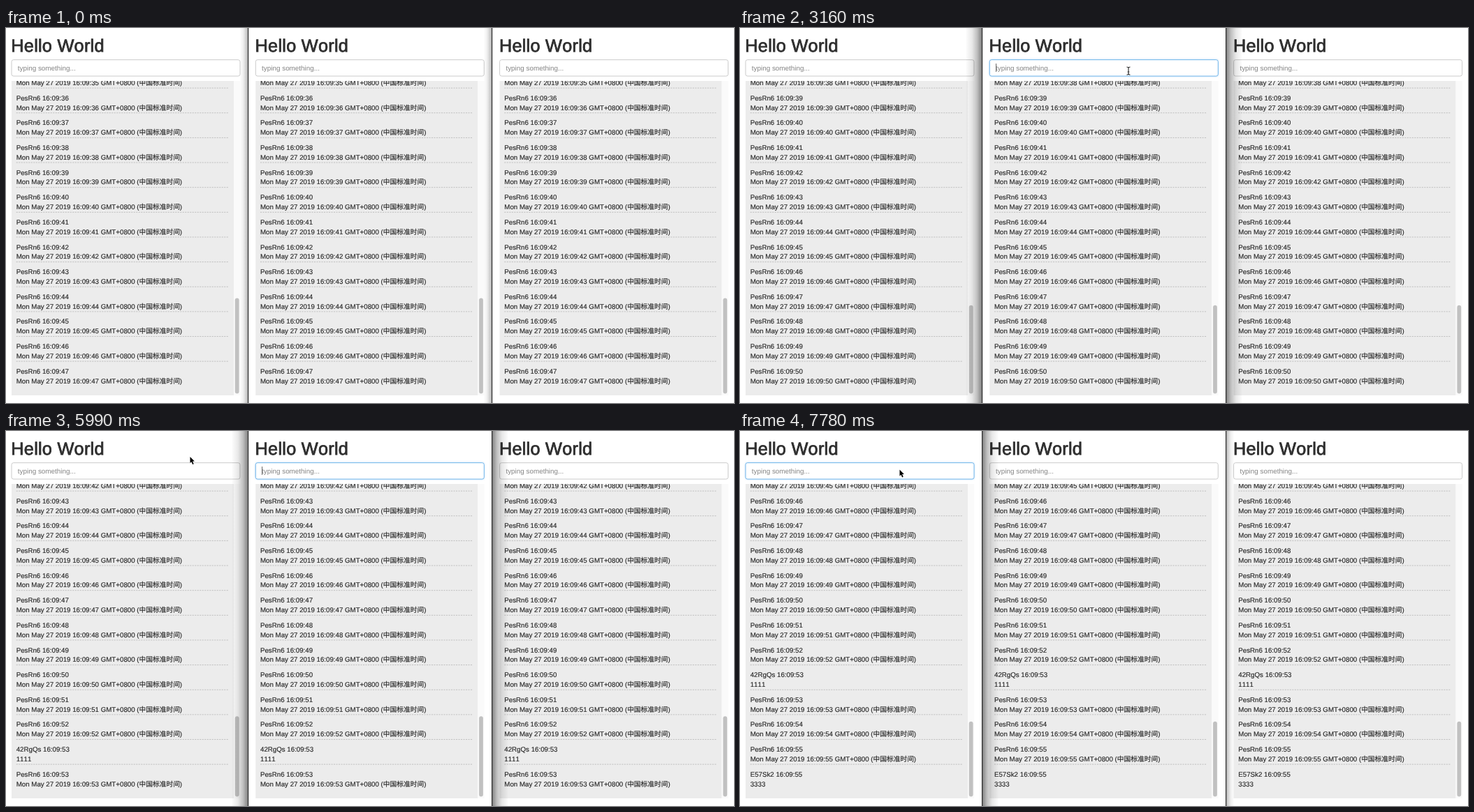
An HTML page for the animation above (8000 ms loop, 1042 by 538 pixels).

```html
<!DOCTYPE html>
<html lang="zh-CN">
<head>
<meta charset="utf-8">
<title>Hello World</title>
<style>
  html, body { margin: 0; width: 100%; height: 100%; overflow: hidden; background: #fff; }
  svg { display: block; width: 1042px; height: 538px; }
  text {
    font: 9.72px "Liberation Sans", "Noto Sans CJK SC", "Noto Sans CJK", sans-serif;
    font-kerning: none; text-rendering: geometricPrecision; white-space: pre;
    fill: #262626; stroke: #262626; stroke-width: .15px;
  }
  .title { font-size: 25.3px; letter-spacing: .25px; fill: #2e2e2e; stroke: #2e2e2e; stroke-width: .8px; }
  .field { font-size: 9.9px; stroke: none; }
</style>
</head>
<body>
<svg id="stage" viewBox="0 0 1042 538" xmlns="http://www.w3.org/2000/svg">
  <defs>
    <clipPath id="view"><rect x="8" y="76" width="318" height="451"/></clipPath>
    <filter id="blur" x="-10%" y="-60%" width="120%" height="220%"><feGaussianBlur stdDeviation="1.7"/></filter>
    <linearGradient id="fade">
      <stop offset="0" stop-opacity="1"/>
      <stop offset=".3" stop-opacity=".5"/>
      <stop offset=".6" stop-opacity=".18"/>
      <stop offset="1" stop-opacity="0"/>
    </linearGradient>
  </defs>
</svg>
<script>
const LOOP = 8000, STEP = 349.3, ROWS = 13, PITCH = 35.64;
const BOT = 'PesRn6', MID = '42RgQs', LEFT = 'E57Sk2';
const EDGES = [346.5, 695.5];
const stage = document.getElementById('stage');

function add(parent, tag, attrs, content) {
  const el = document.createElementNS('http://www.w3.org/2000/svg', tag);
  set(el, attrs);
  if (content) el.textContent = content;
  parent.appendChild(el);
  return el;
}
function set(el, attrs) {
  for (const k in attrs) el.setAttribute(k, attrs[k]);
}
function show(el, on) {
  el.style.display = on ? '' : 'none';
}
// Last entry whose start time has been reached
function at(list, t) {
  let found = list[0];
  for (const item of list) if (item[0] <= t) found = item;
  return found;
}

// Chat log: one automatic message per second plus two typed ones
const log = [];
function post(t, name, sec, body) {
  log.push({ t, name: `${name} 16:09:${sec}`, body });
}
const ticks = [300, 1230, 2270, 3310, 4210, 5260, 6290, 7330];
for (let sec = 35; sec <= 55; sec++) {
  if (sec === 53) post(4810, MID, 53, '1111');
  post(sec < 48 ? 0 : ticks[sec - 48], BOT, sec,
    `Mon May 27 2019 16:09:${sec} GMT+0800 (中国标准时间)`);
}
post(7330, LEFT, 55, '3333');

// Focused panel, typed text, caret and pointer over time
const focus = [[0, -1], [2870, 1], [6290, 0]];
const typed = [[0, ''], [4210, '1'], [4360, '11'], [4510, '111'], [4660, '1111'], [4810, ''],
  [6740, '3'], [6890, '33'], [7030, '333'], [7180, '3333'], [7330, '']];
const caret = [[0, 0], [2870, 1], [3310, 0], [3910, 1], [5400, 0], [5850, 1], [7780, 0]];
const pointer = [[0, ''], [1670, 'arrow', 628, 475], [1820, 'arrow', 549, 266],
  [2120, 'arrow', 565, 200], [2270, 'arrow', 631, 150], [2420, 'arrow', 600, 92],
  [2720, 'beam', 556, 61.5], [5700, 'arrow', 460, 42], [5850, 'arrow', 340, 38],
  [5990, 'arrow', 263.5, 37], [6140, 'arrow', 240, 49], [6290, 'arrow', 228.5, 55.5]];

function makePanel(i) {
  const g = add(stage, 'g', { transform: `translate(${i * STEP} 0)` });
  add(g, 'text', { class: 'title', x: 7.3, y: 34.3 }, 'Hello World');

  const box = { x: 8, y: 45.6, width: 327, height: 23.4, rx: 2.8 };
  const glow = add(g, 'rect', { ...box, fill: '#66afe9', opacity: .6, filter: 'url(#blur)' });
  const field = add(g, 'rect', { ...box, fill: '#fff' });
  const value = add(g, 'text', { class: 'field', x: 16.8, y: 60.6 });
  const bar = add(g, 'rect', { y: 51, width: 1, height: 12, fill: '#666' });

  add(g, 'rect', { x: 8, y: 76, width: 318, height: 451, fill: '#ececec' });
  add(g, 'rect', { x: 326, y: 76, width: 9.3, height: 451, fill: '#fafafa' });
  const thumb = add(g, 'rect', { x: 327.8, width: 5.8, rx: 2.9, fill: '#c1c1c1' });

  const list = add(g, 'g', { 'clip-path': 'url(#view)' });
  const rows = [];
  for (let r = 0; r < ROWS; r++) {
    const y = 495.7 - (ROWS - 1 - r) * PITCH;
    rows.push({
      name: add(list, 'text', { x: 14.7, y }),
      body: add(list, 'text', { x: 14.7, y: y + 13.9 })
    });
    if (r < ROWS - 1) add(list, 'path', {
      d: `M14.7 ${y + 18.1}H318`, stroke: '#b4b4b4', 'stroke-width': .8, 'stroke-dasharray': '2.1 1.4'
    });
  }
  return { glow, field, value, bar, thumb, rows };
}

const panels = [0, 1, 2].map(makePanel);
const shades = EDGES.map(x => {
  const shade = add(stage, 'rect', { width: 1, height: 538, fill: 'url(#fade)' });
  add(stage, 'rect', { x: x - .5, width: 1.2, height: 538, fill: '#2b2b2b' });
  return shade;
});
const cursors = {
  arrow: add(stage, 'path', {
    d: 'M0 0V9L2 7.2L3.6 11L5.2 10.3L3.6 6.6H6.4Z',
    stroke: '#fff', 'stroke-width': 1.2, 'paint-order': 'stroke'
  }),
  beam: add(stage, 'path', {
    d: 'M-2.5 -5.5Q0 -5.5 0 -4Q0 -5.5 2.5 -5.5M0 -4V4M-2.5 5.5Q0 5.5 0 4Q0 5.5 2.5 5.5M-1.3 1.5H1.3',
    fill: 'none', stroke: '#222', 'stroke-width': 1.1
  })
};

// Window shadow falling from an edge to one side
function cast(shade, x, side, strong) {
  set(shade, {
    transform: `translate(${x} 0) scale(${side * (strong ? 24 : 12)} 1)`,
    opacity: strong ? .5 : .32
  });
}

function render(t) {
  const active = at(focus, t)[1];
  const text = at(typed, t)[1];
  const seen = log.filter(m => m.t <= t);
  const last = seen.slice(-ROWS);
  const size = 5070 / (37 + seen.length - ROWS);

  panels.forEach((p, i) => {
    const on = i === active;
    const str = on ? text : '';
    show(p.glow, on);
    set(p.field, { stroke: on ? '#66afe9' : '#c6c6c6', 'stroke-width': .9 });
    p.value.textContent = str || 'typing something...';
    p.value.style.fill = str ? '#4a4a4a' : '#848484';
    show(p.bar, on && (str || at(caret, t)[1]));
    set(p.bar, { x: 16.8 + str.length * 5.5 });
    set(p.thumb, { y: 524.5 - size, height: size });
    p.rows.forEach((row, r) => {
      row.name.textContent = last[r].name;
      row.body.textContent = last[r].body;
    });
  });

  cast(shades[0], EDGES[0], active === 0 ? 1 : -1, active >= 0);
  cast(shades[1], EDGES[1], active < 0 ? -1 : 1, active === 1);

  const [, kind, x, y] = at(pointer, t);
  for (const k in cursors) {
    show(cursors[k], k === kind);
    if (k === kind) set(cursors[k], { transform: `translate(${x} ${y})` });
  }
}

const start = performance.now();
function frame() {
  render((performance.now() - start) % LOOP);
  requestAnimationFrame(frame);
}
frame();
</script>
</body>
</html>
```
